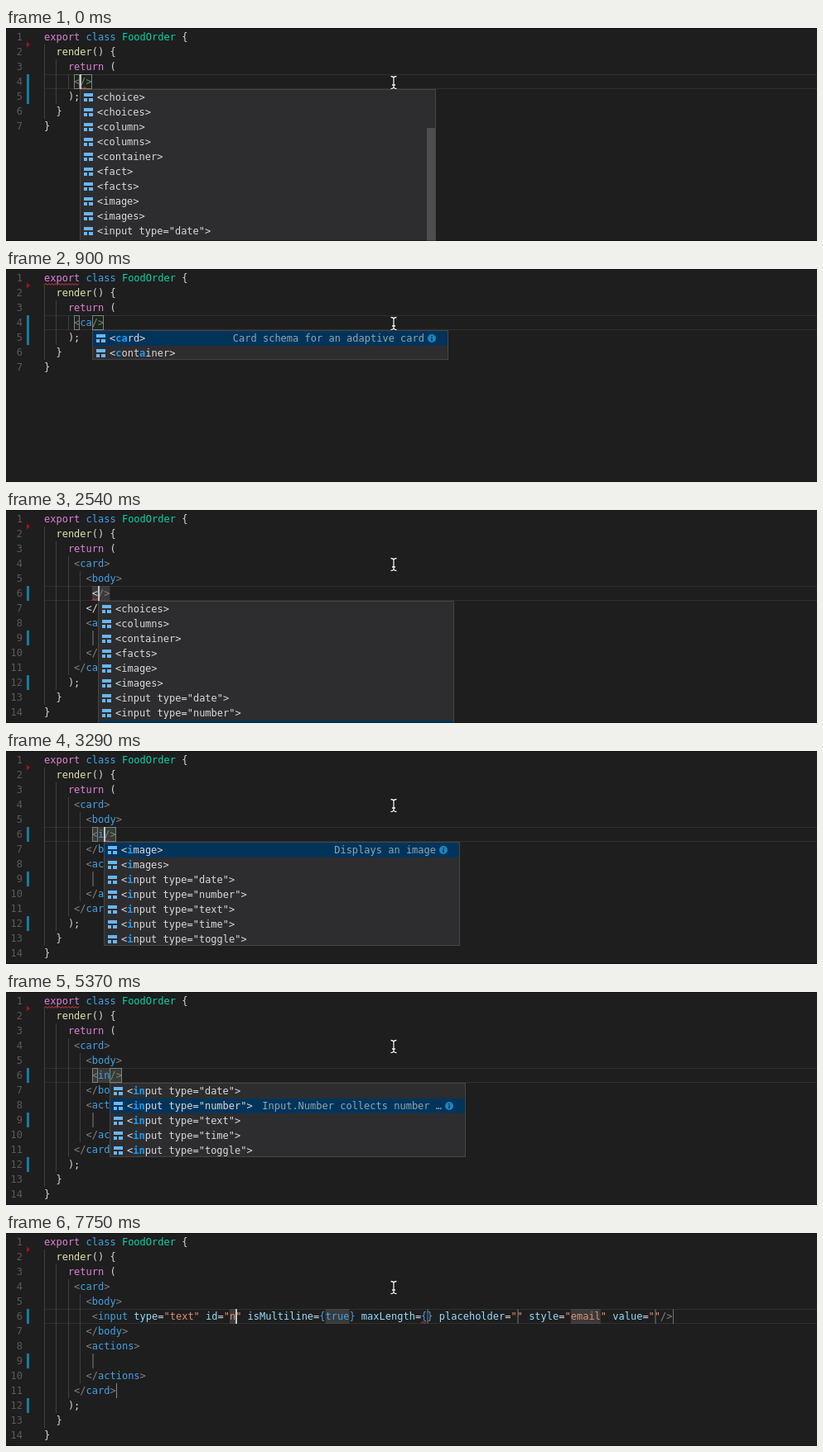
Write an HTML page with a canvas that moves like this. It is 979 by 258 pixels and loops after 8000 ms.

```html
<!DOCTYPE html>
<html lang="en">
<head>
<meta charset="utf-8">
<title>Code completion</title>
<style>
html, body { margin: 0; width: 100%; height: 100%; overflow: hidden; background: #1e1e1e; }
canvas { display: block; }
</style>
</head>
<body>
<canvas id="stage" width="979" height="258"></canvas>
<script>
const ctx = document.getElementById('stage').getContext('2d');
const LOOP = 8000, SIZE = 12, CELL = SIZE * 0.602, LINE = 18, LEFT = 46, TOP = 2;
const FONT = SIZE + 'px "DejaVu Sans Mono", "Liberation Mono", monospace';
const C = {
  bg: '#1e1e1e', text: '#d8d8d8', kw: '#de82d6', blue: '#40a3e8', type: '#00d5a8',
  fn: '#e4e4ac', dim: '#808080', attr: '#92deff', str: '#dd9174', num: '#5a5a5a',
  guide: '#404040', mod: '#167ca0', red: '#f03a48', slot: 'rgba(124,124,124,0.3)'
};
const BLINKS = [900, 1350, 1790, 2240, 2990, 3290, 4330, 4770, 5370, 5820, 6260, 6860];

const colX = col => LEFT + col * CELL;
const rowY = row => TOP + (row - 1) * LINE;

function rect(x, y, w, h, color) {
  ctx.fillStyle = color;
  ctx.fillRect(x, y, w, h);
}

// Lays text on the monospace grid.
function write(text, x, base, color, bold) {
  ctx.font = (bold ? 'bold ' : '') + FONT;
  ctx.fillStyle = color;
  [...text].forEach((ch, i) => {
    if (ch !== ' ') ctx.fillText(ch, x + i * CELL, base);
  });
}

// Parts alternate between a colour name and its text.
function line(row, indent, ...parts) {
  for (let c = 0; c < indent; c += 2) rect(Math.round(colX(c)), rowY(row), 1, LINE, C.guide);
  let col = indent;
  for (let i = 0; i < parts.length; i += 2) {
    write(parts[i + 1], colX(col), rowY(row) + 13, C[parts[i]]);
    col += parts[i + 1].length;
  }
}

const tag = (row, indent, name, open = '<') =>
  line(row, indent, 'dim', open, 'blue', name, 'dim', '>');

function squiggle(row, col, len) {
  const x0 = Math.round(colX(col)), x1 = Math.round(colX(col + len)), y = rowY(row) + 15;
  ctx.strokeStyle = C.red;
  ctx.lineWidth = 1;
  ctx.beginPath();
  for (let x = x0; x <= x1; x += 2) ctx.lineTo(x, y + ((x - x0) % 4 ? 0.5 : 2.5));
  ctx.stroke();
}

function bracket(row, col, len) {
  const x = Math.round(colX(col)), w = Math.round(colX(col + len)) - x;
  rect(x, rowY(row), w, LINE, 'rgba(0,100,0,0.1)');
  ctx.strokeStyle = '#808080';
  ctx.lineWidth = 1;
  ctx.strokeRect(x + 0.5, rowY(row) + 0.5, w - 1, LINE - 1);
}

const slot = (row, col, len) => rect(colX(col), rowY(row), len * CELL, LINE, C.slot);
const stop = (row, col, color = '#4c4c4c') =>
  rect(Math.round(colX(col)), rowY(row), len1(color), LINE, color);
const len1 = color => color === '#4c4c4c' ? 2 : 1;
const caret = (row, col) => rect(Math.round(colX(col)), rowY(row), 2, LINE, '#c4c5c3');

function activeLine(row) {
  rect(LEFT, rowY(row), 979 - LEFT, 1, '#2f2f2f');
  rect(LEFT, rowY(row) + LINE - 1, 979 - LEFT, 1, '#2f2f2f');
}

function icon(x, y) {
  rect(x, y, 11, 4, '#69b7f2');
  rect(x, y + 6, 4, 4, '#69b7f2');
  rect(x + 6, y + 6, 5, 4, '#69b7f2');
}

function infoDot(x, y) {
  ctx.fillStyle = '#1c84bd';
  ctx.beginPath();
  ctx.arc(x, y, 5, 0, 7);
  ctx.fill();
  rect(x - 0.7, y - 3, 1.4, 1.4, '#06304c');
  rect(x - 0.7, y - 0.8, 1.4, 3.8, '#06304c');
}

// Index of each typed letter inside a label.
function matches(label, typed) {
  let at = 0;
  return [...typed].map(ch => (at = label.indexOf(ch, at + 1)));
}

function popup(row, col, items, { typed = '', sel = -1, note = '', rows = items.length, thumb = 0 } = {}) {
  const x = Math.round(colX(col)), y = rowY(row + 1), h = rows * LINE;
  rect(x, y, 430, h, '#454547');
  rect(x + 1, y + 1, 428, h - 2, '#2d2d30');
  ctx.save();
  ctx.beginPath();
  ctx.rect(x + 1, y + 1, 428, h - 2);
  ctx.clip();
  items.forEach((name, i) => {
    const top = y + 1 + i * LINE, label = '<' + name + '>', hits = matches(label, typed);
    if (i === sel) rect(x + 1, top, 428, LINE, '#02345a');
    icon(x + 5, top + 4);
    [...label].forEach((ch, k) => {
      const hit = hits.includes(k);
      write(ch, x + 21 + k * CELL, top + 13, hit ? '#189cf8' : '#dadada', hit);
    });
    if (i === sel && note) {
      const room = Math.floor((380 - label.length * CELL - 10) / CELL);
      const shown = note.length > room ? note.slice(0, room - 1) + '…' : note;
      write(shown, x + 401 - shown.length * CELL, top + 13, '#8fa5b5');
      infoDot(x + 410, top + 9);
    }
  });
  if (thumb) rect(x + 419, y + thumb, 10, h, '#4d4d50');
  ctx.restore();
}

const inputs = ['date', 'number', 'text', 'time', 'toggle'].map(t => `input type="${t}"`);
const boxes = ['choices', 'columns', 'container', 'facts', 'image', 'images'];
const cItems = ['card', 'choice', 'choices', 'column', 'columns', 'container'];
const allItems = ['choice', 'choices', 'column', 'columns', 'container', 'fact', 'facts',
  'image', 'images', ...inputs];
const cardNote = 'Card schema for an adaptive card';
const inputNotes = ['Input.Date collects Date from the user',
  'Input.Number collects number from the user', 'Input.Text collects text from the user'];

function frameCode(last) {
  line(1, 0, 'kw', 'export ', 'blue', 'class ', 'type', 'FoodOrder', 'text', ' {');
  line(2, 2, 'fn', 'render', 'text', '() {');
  line(3, 4, 'kw', 'return', 'text', ' (');
  line(last - 2, 4, 'text', ');');
  line(last - 1, 2, 'text', '}');
  line(last, 0, 'text', '}');
  for (let n = 1; n <= last; n++) {
    const s = String(n);
    write(s, 20 - s.length * CELL, rowY(n) + 13, C.num);
  }
  ctx.fillStyle = '#a01420';
  ctx.beginPath();
  ctx.moveTo(25, 16.5);
  ctx.lineTo(29, 20);
  ctx.lineTo(25, 23.5);
  ctx.fill();
}

const modified = (from, to = from) =>
  rect(25, rowY(from), 3, (to - from + 1) * LINE, C.mod);

function typingCard(t, blink) {
  const typed = t < 300 ? '' : t < 450 ? 'c' : 'ca', end = 6 + typed.length;
  activeLine(4);
  frameCode(7);
  modified(4, 5);
  bracket(4, 5, 1);
  bracket(4, end, 2);
  line(4, 5, 'dim', '<', 'blue', typed, 'dim', '/>');
  if (t < 600) squiggle(4, end, 1);
  else squiggle(1, 0, 6);
  if (blink) caret(4, end);
  if (!typed) popup(4, end, allItems, { rows: 12, thumb: 47 });
  else popup(4, end, typed === 'c' ? cItems : ['card', 'container'], { typed, sel: 0, note: cardNote });
}

function cardBody(t) {
  const broken = t >= 2540 && t < 3290;
  activeLine(6);
  frameCode(14);
  if (t < 1500) modified(4, 12);
  else [6, 9, 12].forEach(n => modified(n));
  tag(4, 5, 'card');
  tag(5, 7, 'body');
  if (broken) line(7, 7, 'text', '</body>');
  else tag(7, 7, 'body', '</');
  tag(8, 7, 'actions');
  line(9, 8);
  stop(9, 8);
  tag(10, 7, 'actions', '</');
  tag(11, 5, 'card', '</');
  stop(11, 12, '#8a8a8a');
  if (t < 1500 || (t >= 3880 && t < 7010)) squiggle(1, 0, 6);
}

function typingInput(t, blink) {
  const typed = t < 3290 ? '' : t < 3880 ? 'i' : 'in', end = 9 + typed.length;
  slot(6, 8, typed.length + 3);
  if (t >= 2690) {
    bracket(6, 8, 1);
    bracket(6, end, 2);
  }
  line(6, 8, t < 2690 ? 'text' : 'dim', '<', 'blue', typed, 'dim', '/>');
  if (t < 2690) squiggle(6, 8, 1);
  else if (t < 3880) squiggle(6, end, 1);
  if (blink) caret(6, end);
  if (!typed) popup(6, end, [...boxes, ...inputs], { rows: 12, sel: 8 });
  else if (typed === 'i') popup(6, end, ['image', 'images', ...inputs], { typed, sel: 0, note: 'Displays an image' });
  else {
    const sel = t < 5370 ? 0 : t < 5820 ? 1 : 2;
    popup(6, end, inputs, { typed, sel, note: inputNotes[sel] });
  }
}

function fullInput(t, blink) {
  const id = t < 7750 ? '' : 'n', n = id.length;
  slot(6, 31, n);
  slot(6, 38 + n + 8, 4);
  slot(6, 79 + n + 8, 5);
  [55, 70, 93].forEach(c => stop(6, c + n + 8));
  stop(6, 96 + n + 8, '#707070');
  line(6, 8, 'dim', '<', 'blue', 'input', 'attr', ' type', 'text', '=', 'str', '"text"',
    'attr', ' id', 'text', '=', 'str', `"${id}"`,
    'attr', ' isMultiline', 'text', '=', 'blue', '{true}',
    'attr', ' maxLength', 'text', '=', 'blue', '{}',
    'attr', ' placeholder', 'text', '=', 'str', '""',
    'attr', ' style', 'text', '=', 'str', '"email"',
    'attr', ' value', 'text', '=', 'str', '""', 'dim', '/>');
  if (t >= 7010) squiggle(6, 54 + n + 8, 1);
  if (blink) caret(6, 31 + n);
}

function pointer(x, y) {
  const path = new Path2D(`M${x - 3.5} ${y - 7.5}Q${x} ${y - 7.5} ${x} ${y - 5}V${y + 5}` +
    `Q${x} ${y + 7.5} ${x - 3.5} ${y + 7.5}M${x + 3.5} ${y - 7.5}Q${x} ${y - 7.5} ${x} ${y - 5}` +
    `M${x} ${y + 5}Q${x} ${y + 7.5} ${x + 3.5} ${y + 7.5}M${x - 2} ${y + 3}H${x + 2}`);
  for (const [w, color] of [[3, '#101010'], [1.3, '#f4f4f4']]) {
    ctx.lineWidth = w;
    ctx.strokeStyle = color;
    ctx.stroke(path);
  }
}

function draw(t) {
  const blink = BLINKS.filter(b => b <= t).length % 2 === 0;
  rect(0, 0, 979, 258, C.bg);
  if (t < 1350) typingCard(t, blink);
  else {
    cardBody(t);
    if (t < 2540) {
      line(6, 8);
      stop(6, 8);
      if (blink) caret(6, 8);
    } else if (t < 6860) typingInput(t, blink);
    else fullInput(t, blink);
  }
  pointer(468, 66);
  rect(0, 0, 979, 1, 'rgba(0,0,0,0.3)');
  rect(0, 257, 979, 1, 'rgba(0,0,0,0.3)');
}

const start = performance.now();
function tick() {
  draw((performance.now() - start) % LOOP);
  requestAnimationFrame(tick);
}
tick();
</script>
</body>
</html>
```
